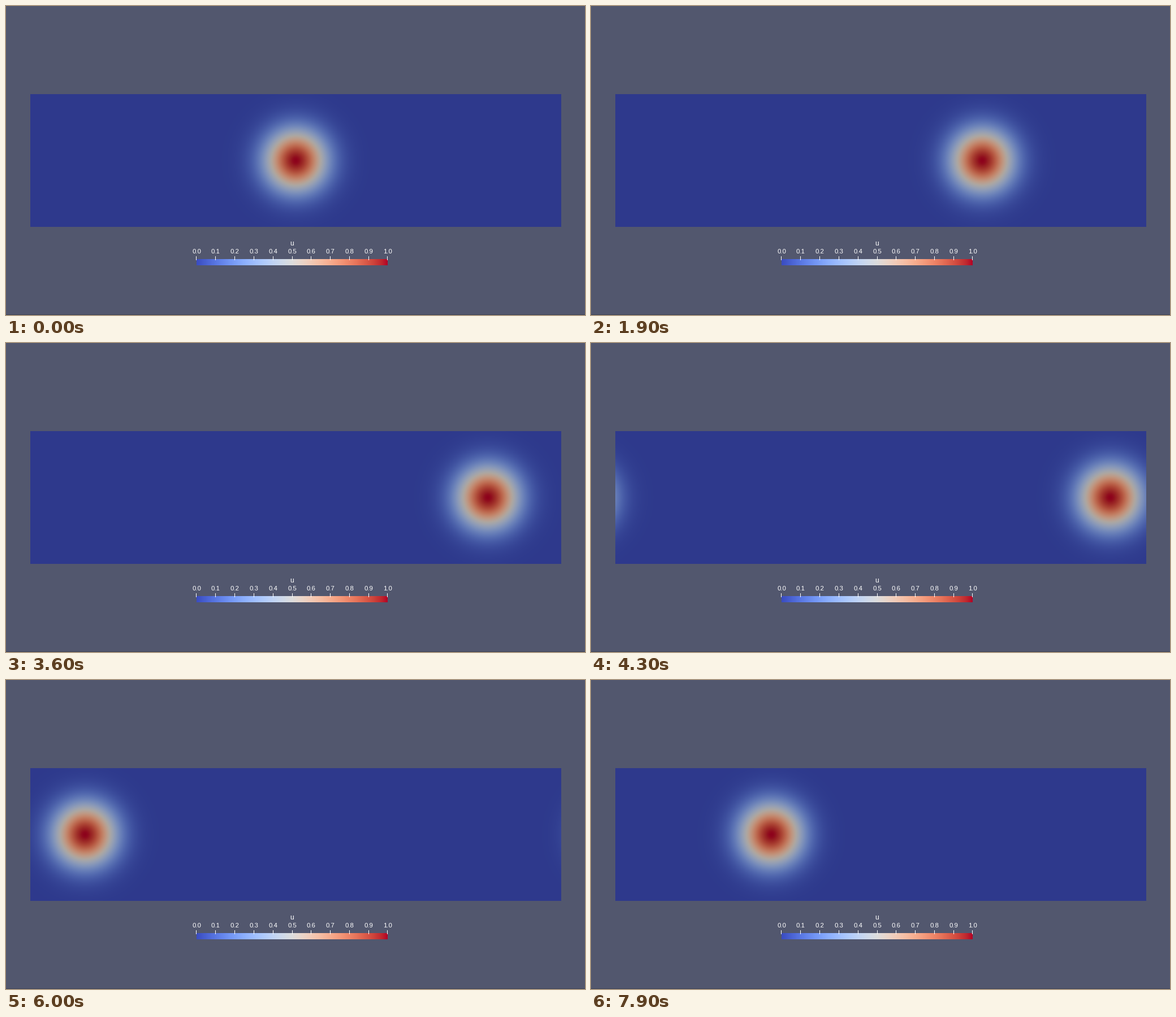
Write a matplotlib script that moves like this. It is 1024 px wide and 547 px high and loops after 8000 ms.

```python
import numpy as np
import matplotlib
import matplotlib.pyplot as plt
from matplotlib.animation import FuncAnimation
from matplotlib.colors import ListedColormap
from matplotlib.patches import Rectangle

W, H, DPI = 1024, 547, 128
FRAMES, INTERVAL = 80, 100

# Field rectangle, pulse and colour bar, all in pixels
LEFT, TOP, WIDTH, HEIGHT = 43, 156, 939, 235
START_X, MID_Y = 512.6, 273.5
SPEED = 9.437
PULSE = 52.5
BAR_X, BAR_Y, BAR_W, BAR_H = 337, 448, 338, 11

LIGHT = np.array([0.785, 0.755, 0.73])

cool_warm = matplotlib.colormaps["coolwarm"].resampled(1024)
shaded = ListedColormap(cool_warm(np.linspace(0, 1, 1024))[:, :3] * LIGHT)

fig = plt.figure(figsize=(W / DPI, H / DPI), dpi=DPI, facecolor="#52576e")
ax = fig.add_axes([0, 0, 1, 1])


def show(data, x, y, w, h, cmap):
    return ax.imshow(data, cmap=cmap, vmin=0, vmax=1, aspect="auto",
                     interpolation="nearest", extent=(x, x + w, y + h, y))


def label(x, y, text, size):
    ax.text(x, y, text, color="white", family="Liberation Sans",
            fontsize=size * 72 / DPI, ha="center", va="baseline")


xs = LEFT + np.arange(WIDTH) + 0.5
ys = TOP + np.arange(HEIGHT)[:, None] + 0.5
across = np.exp(-((ys - MID_Y) / PULSE) ** 2)


def field(frame):
    """Gaussian pulse carried to the right through periodic ends."""
    dx = xs - (START_X + SPEED * frame)
    dx = (dx + WIDTH / 2) % WIDTH - WIDTH / 2
    return across * np.exp(-(dx / PULSE) ** 2)


pulse = show(field(0), LEFT, TOP, WIDTH, HEIGHT, shaded)
show(np.linspace(0, 1, BAR_W)[None, :], BAR_X, BAR_Y, BAR_W, BAR_H, cool_warm)

for i in range(11):
    x = BAR_X + BAR_W * i / 10
    ax.add_patch(Rectangle((round(x - 0.5), 443), 1, 7, color="white", lw=0))
    label(x, 438, f"{i / 10:.1f}", 11.4)
label(506, 424.5, "u", 12)

ax.add_patch(Rectangle((0, H - 1), W, 1, color="#3e4255", lw=0))

ax.set_xlim(0, W)
ax.set_ylim(H, 0)
ax.axis("off")


def update(frame):
    pulse.set_data(field(frame))
    return [pulse]


anim = FuncAnimation(fig, update, frames=FRAMES, interval=INTERVAL,
                     repeat=True, repeat_delay=0, blit=False)
plt.show()
```
